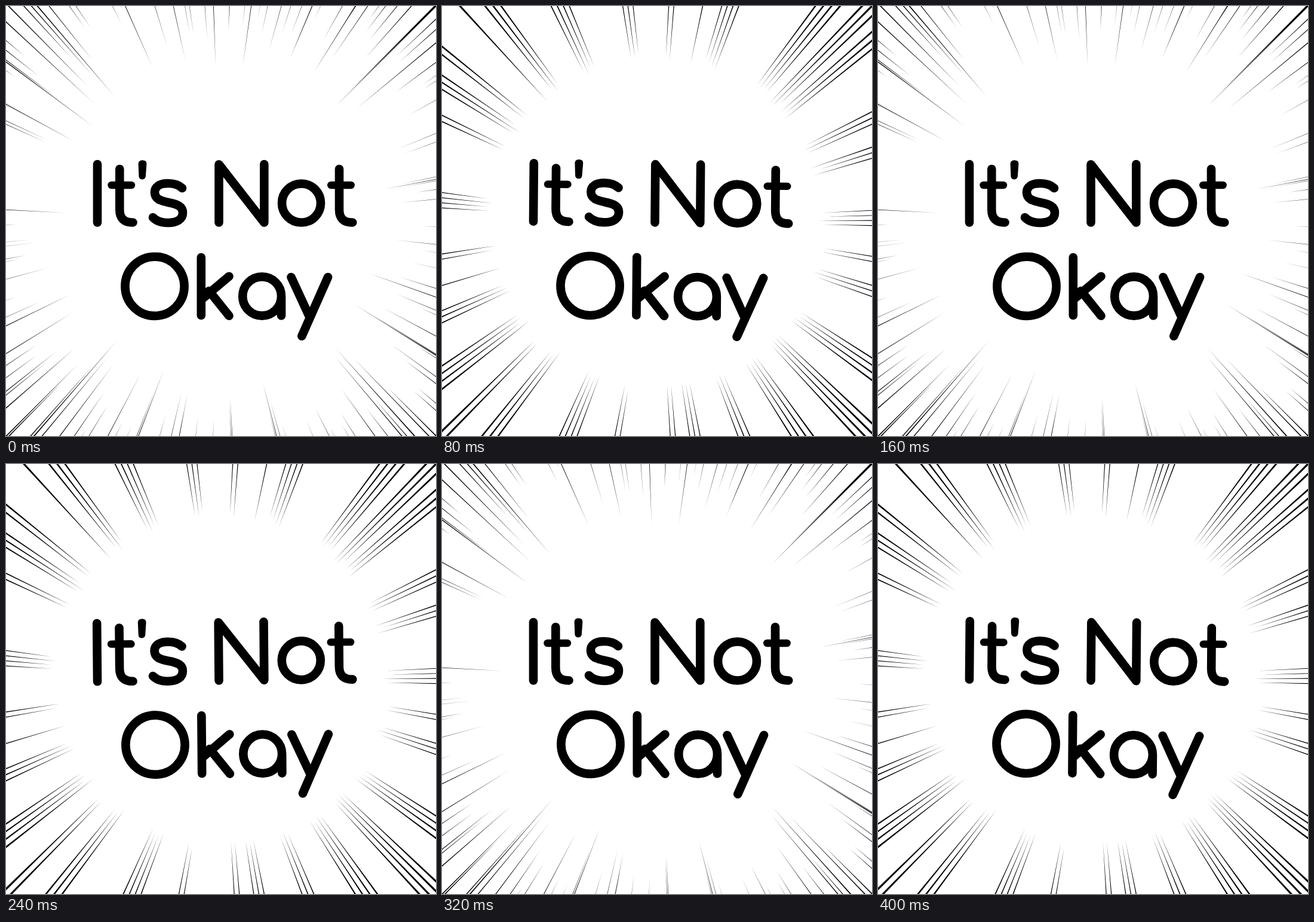
An HTML page for the animation above (0.48 s loop, 720 by 720 pixels).

```html
<!DOCTYPE html>
<html lang="en">
<head>
<meta charset="utf-8">
<title>It's Not Okay</title>
<style>
  html, body { margin: 0; width: 100%; height: 100%; overflow: hidden; background: #fff; }
  svg { display: block; width: 100vw; height: 100vh; }
  #words { fill: none; stroke: #000; stroke-width: 14.6; stroke-linecap: round; stroke-linejoin: round; }
  #words .bar { stroke-width: 12.4; }
</style>
</head>
<body>
<svg viewBox="0 0 720 720" role="img" aria-label="It's Not Okay">
  <path id="fine"/>
  <path id="bold"/>
  <g id="words">
    <path d="M153 265V362.5"/>
    <g id="t">
      <path d="M190.3 273V341Q190.3 362.7 212.5 362.5"/>
      <path class="bar" d="M176.5 300H210"/>
    </g>
    <path d="M221.6 264Q222 258.2 228.6 258.2Q235.6 258.2 235.4 264.5L233.9 285Q233.4 290.4 228 290.4Q222.8 290.4 222.4 285Z" fill="#000" stroke="none"/>
    <path d="M295 305C289 299 281 297 271 297C257 297 249 303 249 312C249 323 258 326 272 329C288 332 296 336 296 346C296 357 286 363 271 363C260 363 252 360 246 354"/>
    <path d="M356.5 362.5V265.2L432.3 362.5V265"/>
    <circle cx="494.5" cy="330" r="32.5"/>
    <use href="#t" x="367.7"/>
    <circle cx="249" cy="469.3" r="49.6"/>
    <path d="M326.8 421V518M328 491L373.5 452.7M340 477L373.5 518.8"/>
    <path d="M461 518.5V486A32.4 32.6 0 1 0 428.6 518.6A32.4 32.6 0 0 0 461 486"/>
    <path d="M477.5 454L507.5 519M539 454L495.3 552.7"/>
  </g>
</svg>
<script>
const MID = 360, REACH = 520, STEP = 80, TILT = 0.5;

// Bearings run clockwise in degrees from straight up.
const longRays = [8, 23, 32, 45, 79, 109.5, 122, 138, 165.5, 177, 191, 201,
  221, 244, 273, 298.5, 306.5, 319.5, 336, 347.5, 358];

// Cluster centres, keyed by the number of rays in each cluster.
const clusters = {
  1: [12, 253.3, 317.5],
  2: [3.8, 100, 175.8, 190.4, 225, 260.6, 295.5, 308.4],
  3: [45, 50, 64.4, 72.4, 108, 158, 170, 217.8, 246, 302.8, 322.7, 352.3],
  4: [18.8, 38.4, 89.2, 124.5, 135.3, 146, 202.4, 234, 275.5, 335.8]
};

function seeded(seed) {
  return () => (seed = (seed * 16807) % 2147483647) / 2147483647;
}

function polar(bearing, radius) {
  const a = bearing * Math.PI / 180;
  return [MID + radius * Math.sin(a), MID - radius * Math.cos(a)];
}

// A sliver that narrows from beyond the stage to its tip.
function ray(bearing, tip, width) {
  const half = width / 2 / REACH * 180 / Math.PI;
  const pts = [polar(bearing - half, REACH), polar(bearing, tip), polar(bearing + half, REACH)];
  return "M" + pts.map(p => p.map(v => v.toFixed(2)).join(" ")).join("L") + "Z";
}

function fineBurst() {
  const rand = seeded(4211), count = 165;
  let d = longRays.map(b => ray(b, 258 + 40 * rand(), 2.1)).join("");
  for (let i = 0; i < count; i++) {
    d += ray((i + rand()) * 360 / count, 290 + 150 * rand(), 1.8);
  }
  return d;
}

function boldBurst() {
  const rand = seeded(77), gap = 1.35;
  let d = "";
  for (const [count, centres] of Object.entries(clusters)) {
    for (const centre of centres) {
      for (let i = 0; i < count; i++) {
        d += ray(centre + (i - (count - 1) / 2) * gap, 270 + 16 * rand(), 3.5);
      }
    }
  }
  return d;
}

const get = id => document.getElementById(id);
const fine = get("fine"), bold = get("bold"), words = get("words");
fine.setAttribute("d", fineBurst());
bold.setAttribute("d", boldBurst());

// The bursts alternate; the words tilt one way, rest, then tilt the other.
function draw(ms) {
  const step = Math.floor(ms / STEP) % 6;
  const odd = step % 2 === 1;
  const angle = TILT * Math.round(Math.sin(step * Math.PI / 2));
  fine.setAttribute("visibility", odd ? "hidden" : "visible");
  bold.setAttribute("visibility", odd ? "visible" : "hidden");
  words.setAttribute("transform", `rotate(${angle} ${MID} ${MID})`);
}

const start = performance.now();
function tick() {
  draw(performance.now() - start);
  requestAnimationFrame(tick);
}
tick();
</script>
</body>
</html>
```
